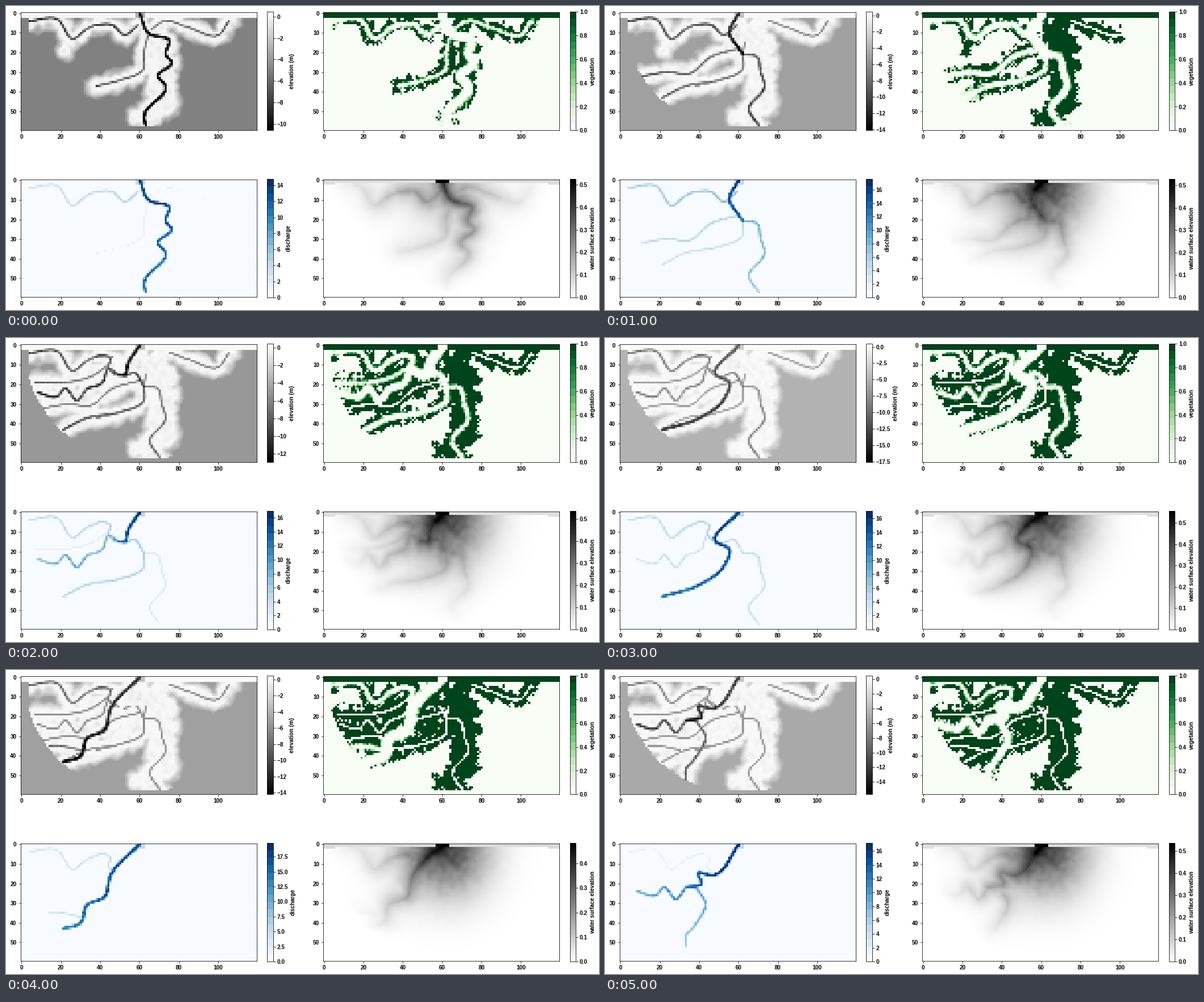
A matplotlib script that plays this animation: 1045 by 536 pixels, repeating every 6 s.

```python
import numpy as np
import matplotlib.pyplot as plt
from matplotlib.animation import FuncAnimation

W, H, DPI = 1045, 536, 72
NX, NY = 120, 60
X, Y = np.meshgrid(np.arange(NX), np.arange(NY))
APEX = np.hypot(X - 60, Y)  # distance from the river mouth
REACH = (APEX < 58.8) & (X >= 4) & (Y < 58)
SHORE = Y < 3
INLET = SHORE & (abs(X - 60) <= 2)

plt.rcParams.update({
    "font.family": "Liberation Sans", "font.size": 10,
    "font.weight": "bold", "axes.labelweight": "bold",
})


def noise(seed, blur=0):
    field = np.random.default_rng(seed).normal(size=(NY, NX))
    for _ in range(blur):
        field = (field + sum(np.roll(field, s, a) for s in (1, -1) for a in (0, 1))) / 5
    return field / field.std()


GRAIN, RAGGED, MOTTLE = noise(1), noise(3, 1), noise(2, 3)
CHANCE = np.random.default_rng(4).random((NY, NX))


def spline(points, steps=6):
    """Smooth curve through key points."""
    pts = np.array(points, float)
    chord = np.hypot(*np.diff(pts, axis=0).T)
    slope = np.gradient(pts, np.r_[0, np.cumsum(chord)], axis=0)
    u = np.linspace(0, 1, steps, endpoint=False)[:, None]
    ease = u * u * (3 - 2 * u)
    curve = [p + (q - p) * ease + c * u * (1 - u) * ((1 - u) * m - u * n)
             for p, q, m, n, c in zip(pts, pts[1:], slope, slope[1:], chord)]
    return np.vstack(curve + [pts[-1:]])


def course(*points):
    """Distance to a smooth course, and how far downstream its nearest point lies."""
    pts = spline(points)
    best, along = np.full((NY, NX), np.inf), np.zeros((NY, NX))
    for i, ((ax, ay), (bx, by)) in enumerate(zip(pts, pts[1:])):
        dx, dy = bx - ax, by - ay
        u = np.clip(((X - ax) * dx + (Y - ay) * dy) / (dx * dx + dy * dy), 0, 1)
        d = np.hypot(X - ax - u * dx, Y - ay - u * dy)
        along = np.where(d < best, (i + u) / (len(pts) - 1), along)
        best = np.minimum(d, best)
    return best, along


# Key points of each course, listed downstream.
FIRST = course((60, 0), (64, 10), (75, 14), (73, 21), (76, 25), (69, 32), (73, 37),
               (62, 53), (63, 57))
WEST = course((59, 6), (52, 11), (46, 6), (37, 6))
FRINGE = course((37, 6), (33, 8), (26, 13), (18, 3), (4, 4))
INNER = course((64, 11), (62, 21), (62, 28), (50, 34), (38, 37))
EAST = course((66, 8), (72, 4), (84, 7), (100, 11), (105, 4))
ELBOW = course((60, 0), (55, 10), (60, 18), (62, 21))
MIDDLE = course((60, 18), (46, 22), (34, 31), (25, 30), (11, 32))
LOW = course((62, 21), (62, 28), (50, 34), (33, 37), (21, 43))
SOUTH = course((62, 21), (69, 22), (71, 30), (73, 37), (65, 49), (70, 57))
HOOK = course((60, 0), (54, 9), (52, 15), (49, 15))
NORTH = course((47, 15), (44, 11), (45, 7), (41, 5), (37, 6))
LINK = course((49, 15), (44, 12), (41, 19), (33, 22))
WAVE = course((33, 22), (28, 28), (22, 22), (18, 26), (8, 24))
SHELF = course((44, 10), (35, 16), (22, 19), (7, 19))
ARCH = course((52, 16), (57, 14), (62, 21))
ZIGZAG = course((60, 0), (48, 15), (55, 19), (52, 28), (40, 37), (21, 43))
CHUTE = course((60, 0), (45, 16), (42, 27), (33, 31), (30, 40), (21, 43))
SIDE = course((30, 37), (19, 35), (14, 35))
BEND = course((60, 0), (47, 16), (39, 15), (41, 20), (33, 22))
DROP = course((38, 22), (43, 30), (37, 42), (33, 47), (33, 52))

# Each stage: deepest bed, greatest flow, highest water, then courses with
# their flow; the trunk comes first.
STAGES = [
    (-10.6, 14.8, .526, [(FIRST, 14), (WEST, 5), (FRINGE, 4), (INNER, 1.3), (EAST, 1)]),
    (-14.1, 17.6, .528, [(ELBOW, 17), (WEST, 8), (FRINGE, 7), (MIDDLE, 5.5), (LOW, 4.5),
                         (SOUTH, 9)]),
    (-13.0, 17.0, .535, [(HOOK, 17), (NORTH, 6), (FRINGE, 5), (LINK, 9), (WAVE, 9),
                         (ARCH, 7), (LOW, 6), (SOUTH, 3), (SHELF, 2)]),
    (-17.6, 17.1, .556, [(ZIGZAG, 17), (NORTH, 6), (FRINGE, 5), (LINK, 4), (WAVE, 4),
                         (ARCH, 5), (SOUTH, 4.5)]),
    (-14.2, 19.8, .484, [(CHUTE, 18), (NORTH, 5), (FRINGE, 4), (SIDE, 4)]),
    (-15.7, 17.2, .535, [(BEND, 17), (WAVE, 11), (DROP, 9), (NORTH, 2), (FRINGE, 2)]),
]

# Wide deposits: the stage that lays them down, spine, half-width.
FLOODS = [
    (0, course((70, 14), (71, 46)), 8),
    (0, course((67, 52), (58, 53)), 4.5),
    (0, course((26, 12), (22, 19)), 4),
    (2, course((36, 16), (46, 19)), 9),
]


def bank_height(index):
    """How far inside the deposits each cell lies; negative is outside."""
    lobes = [(c, 4.5) for *_, rivers in STAGES[:index + 1] for c, _ in rivers]
    lobes += [(c, r) for stage, c, r in FLOODS if stage <= index]
    return np.max([r - d for (d, _), r in lobes], axis=0) + .6 * MOTTLE


def build(index):
    low, top_flow, level, rivers = STAGES[index]
    bank = bank_height(index)
    land = np.clip((bank + 2.3) / 4, 0, 1) * REACH
    bed = -5 + 5.1 * land - .3 * np.abs(MOTTLE) * land
    bed[SHORE] = .05
    green = ((bank + .9 * RAGGED > 1.2) & REACH).astype(float)

    # Trunks silt up when the river moves; lesser courses remain as grooves.
    for *_, earlier in STAGES[:index]:
        for (d, _), _ in earlier[1:]:
            groove = (d < .62) & (APEX > 15)
            bed[groove] = np.minimum(bed, -6 * np.clip((.8 - d) / .55, 0, 1))[groove]
            green[groove] = 0

    flow = np.where(INLET, .3 * top_flow, 0.0)
    plume = np.zeros((NY, NX))
    nearest = np.full((NY, NX), np.inf)
    for (d, t), strength in rivers:
        shape = np.clip((.75 + .02 * strength - d) / .55, 0, 1) * (1 + .08 * GRAIN)
        depth = (5 + .35 * strength) * (1 + .3 * t)
        bed = np.where(shape > 0, np.minimum(bed, -depth * shape), bed)
        flow = np.maximum(flow, strength * (1 - .25 * t) * shape)
        height = level * (.35 + .5 * strength / top_flow) * np.clip(1 - APEX / 58, 0, 1)
        plume = np.maximum(plume, height * np.exp(-d / 5))
        nearest = np.minimum(nearest, d)
        clear = .35 + .12 * strength
        green *= np.clip((d - clear) / .9 + .25 * GRAIN * (d < clear + 1), 0, 1)
    bed[INLET] = np.minimum(bed, -3)[INLET]

    # Plants start along the channels and are sparse on new ground far out.
    green *= nearest < 4.3 + MOTTLE + 30 * index
    fresh = bank_height(index - 1) < 0 if index else REACH
    age = np.where(fresh, np.clip((62 - APEX) / 18, 0, 1), 1)
    green *= np.where(CHANCE < age, 1, .6 * age)
    green[SHORE] = 1
    green[INLET] = 0

    spread = np.where(X < 62, 22, 21)
    swell = level * .72 * min(1, .3 + index)
    swell = swell * np.exp(-((X - 62) / spread) ** 2 - (Y / 24) ** 2)
    surface = np.hypot(swell, plume) * (1 + .05 * MOTTLE * (land > .5))
    surface[(Y < 2) | SHORE & (abs(X - 59.5) > 54)] = .07
    surface[(Y < 2) & (abs(X - 60) <= 3)] = level
    return bed, green, flow, surface


def place(fig, x, y, w, h):
    return fig.add_axes([x / W, 1 - (y + h) / H, w / W, h / H])


def panel(x, y, cmap, label):
    ax = place(fig, x, y, 416, 207.6)
    image = ax.imshow(np.zeros((NY, NX)), cmap=cmap, aspect="auto",
                      interpolation="nearest", vmin=0, vmax=1)
    ax.set_xticks(range(0, 101, 20))
    ax.set_yticks(range(0, 51, 10))
    bar = fig.colorbar(image, cax=place(fig, x + 434.5, y - .7, 10.5, 209))
    bar.set_label(label)
    return image, bar


def rescale(image, bar, low, high, step):
    image.set_clim(low, high)
    ticks = step * np.arange(np.ceil(low / step), np.floor(high / step + 1e-6) + 1)
    digits = 0 if step == 2 else 1
    bar.set_ticks(ticks, labels=[f"{v + 0:.{digits}f}".replace("-", "\u2212") for v in ticks])


fig = plt.figure(figsize=((W + .001) / DPI, (H + .001) / DPI), dpi=DPI, facecolor="white")
PANELS = [
    panel(25.5, 11, "gray", "elevation (m)"),
    panel(559, 11, plt.get_cmap("Greens", 16), "vegetation"),
    panel(25.5, 305.6, plt.get_cmap("Blues", 16), "discharge"),
    panel(559, 305.6, "gray_r", "water surface elevation"),
]
FIELDS = [build(i) for i in range(len(STAGES))]


def draw(index):
    low, top_flow, level, _ = STAGES[index]
    scales = [(low, .45, 2.5 if low < -16 else 2), (0, 1, .2),
              (0, top_flow, 2.5 if top_flow > 18 else 2), (0, level, .1)]
    for (image, bar), field, scale in zip(PANELS, FIELDS[index], scales):
        image.set_data(field)
        rescale(image, bar, *scale)
    return [image for image, _ in PANELS]


animation = FuncAnimation(fig, draw, frames=len(STAGES), interval=1000,
                          repeat=True, repeat_delay=0, blit=False)
plt.show()
```
